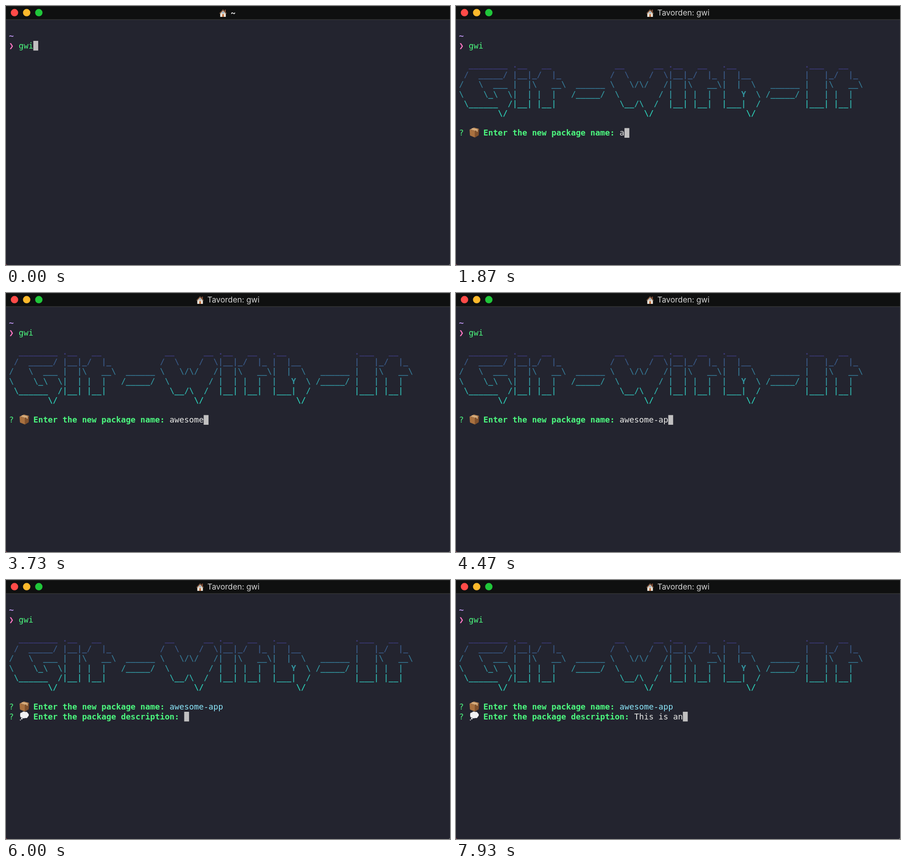
These frames come from a looping animation (978 by 572 pixels, 8 s). An HTML page with a canvas:

```html
<!DOCTYPE html>
<html lang="en">
<head>
<meta charset="utf-8">
<title>Terminal</title>
<style>
  html, body { margin: 0; width: 100%; height: 100%; overflow: hidden; background: #23242f; }
  canvas { display: block; width: 978px; height: 572px; }
</style>
</head>
<body>
<canvas id="stage" width="978" height="572"></canvas>
<script>
const ctx = document.getElementById("stage").getContext("2d");
const W = 978, H = 572, LOOP = 8000;

// Terminal grid
const X0 = 6.6, Y0 = 34.2, CELL = 10.72, LINE = 21.4, BASE = 16.6;
const MONO = '17.8px "DejaVu Sans Mono", monospace';
const SANS = "17.3px Inter, sans-serif";

const GREEN = "#4cf87f", WHITE = "#e8e8e6", CYAN = "#8be5f8";

const BANNER = String.raw`
  ________ .__   __             __      __ .__   __   .__              .___   __
 /  _____/ |__|_/  |_          /  \    /  \|__|_/  |_ |  |__           |   |_/  |_
/   \  ___ |  |\   __\  ______ \   \/\/   /|  |\   __\|  |  \   ______ |   |\   __\
\    \_\  \|  | |  |   /_____/  \        / |  | |  |  |   Y  \ /_____/ |   | |  |
 \______  /|__| |__|             \__/\  /  |__| |__|  |___|  /         |___| |__|
        \/                            \/                   \/
`.split("\n").slice(1, 7);

// Times in ms; each answer is typed at a steady pace
const RUN = 30, TITLE = 70, READY = 300, SUBMIT = 5430;
const NAME = { text: "awesome-app", start: 1800, pace: 295 };
const ABOUT = { text: "This is an", start: 6100, pace: 185 };

function typed({ text, start, pace }, t) {
  return text.slice(0, Math.max(0, Math.floor((t - start) / pace) + 1));
}

function rect(color, x, y, w, h) {
  ctx.fillStyle = color;
  ctx.fillRect(x, y, w, h);
}

function disc(color, x, y, r) {
  ctx.fillStyle = color;
  ctx.beginPath();
  ctx.arc(x, y, r, 0, Math.PI * 2);
  ctx.fill();
}

function poly(color, ...points) {
  ctx.fillStyle = color;
  ctx.beginPath();
  points.forEach(([x, y]) => ctx.lineTo(x, y));
  ctx.closePath();
  ctx.fill();
}

function at(x, y, draw) {
  ctx.save();
  ctx.translate(x, y);
  draw();
  ctx.restore();
}

function print(text, col, row, color, bold) {
  ctx.font = (bold ? "bold " : "") + MONO;
  ctx.fillStyle = color;
  [...text].forEach((ch, i) => {
    if (ch !== " ") ctx.fillText(ch, X0 + (col + i) * CELL, Y0 + row * LINE + BASE);
  });
}

function cursor(col, row) {
  rect("#c1c0c1", X0 + col * CELL, Y0 + row * LINE, CELL, LINE);
}

function house() {
  rect("#8d5038", 12.3, 1, 2.2, 5);
  rect("#ece5da", 2.3, 8, 12.4, 9);
  poly("#8a6148", [0, 9.5], [8.5, 0.3], [17, 9.5]);
  poly("#ece5da", [3, 9.6], [8.5, 4], [14, 9.6]);
  rect("#6c9cc0", 7.1, 6.2, 2.8, 2.8);
  rect("#c16a35", 6.8, 11, 3.6, 6);
}

function parcel() {
  const left = [0, 5], back = [9.5, 0.5], right = [21, 3.5], front = [12, 8.5], foot = [12, 22.5];
  poly("#c3905e", left, back, right, front);
  poly("#a9713f", left, front, foot, [1, 18]);
  poly("#80512d", front, right, [20.2, 17.5], foot);
  ctx.strokeStyle = "#dbb78b";
  ctx.lineWidth = 2.4;
  ctx.beginPath();
  ctx.moveTo(5, 2.8);
  ctx.lineTo(16.7, 6);
  ctx.lineTo(16.7, 9.5);
  ctx.stroke();
}

function thought() {
  const puffs = 7;
  for (let i = 0; i < puffs; i++) {
    const a = i / puffs * Math.PI * 2;
    disc("#f1f1f3", 10.6 + 5.8 * Math.cos(a), 8.6 + 3.6 * Math.sin(a), 4);
  }
  disc("#dedee3", 5, 16.6, 2);
  disc("#dedee3", 1.9, 19.6, 1.2);
}

function titleBar(t) {
  rect("#0f1010", 0, 0, W, 30);
  rect("#252626", 0, 0, W, 1);
  rect("#42433f", 0, 29.5, W, 1);
  ["#ff4b48", "#fdb92b", "#20c73a"].forEach((c, i) => disc(c, 18.7 + i * 26.8, 14.7, 8.1));
  const running = t >= TITLE;
  at(running ? 419 : 469.5, 7, house);
  ctx.font = (running ? "" : "600 ") + SANS;
  ctx.fillStyle = running ? "#d5d5d5" : "#e6e6e6";
  ctx.fillText(running ? "Tavorden: gwi" : "~", running ? 443.5 : 494.5, 21.3);
}

function banner() {
  BANNER.forEach((line, i) => {
    const color = `rgb(${59 - 3 * i}, ${57 + 30 * i}, ${118 + 13 * i})`;
    print(line, 0, 4 + i, color, true);
  });
}

function question(text, row, icon) {
  print("?", 0, row, GREEN);
  at(29.8, Y0 + row * LINE - 1.5, icon);
  print(text, 5, row, GREEN, true);
}

function corner(color, x, dir) {
  ctx.fillStyle = color;
  ctx.beginPath();
  ctx.moveTo(x, H - 4);
  ctx.quadraticCurveTo(x, H, x + dir * 4, H);
  ctx.lineTo(x, H);
  ctx.fill();
}

function answers(t) {
  const name = typed(NAME, t);
  const done = t >= SUBMIT;
  question("Enter the new package name:", 11, parcel);
  print(name, 33, 11, done ? CYAN : WHITE);
  if (!done) return cursor(33 + name.length, 11);

  const about = typed(ABOUT, t);
  question("Enter the package description:", 12, thought);
  print(about, 36, 12, WHITE);
  cursor(36 + about.length, 12);
}

function draw(t) {
  rect("#23242f", 0, 0, W, H);
  titleBar(t);
  print("~", 0, 1, "#bb93ee", true);
  print("❯", 0, 2, "#ff79c6", true);
  print("gwi", 2, 2, GREEN);

  if (t < RUN) cursor(5, 2);
  else if (t < READY) cursor(0, 3);
  else {
    banner();
    answers(t);
  }
  corner("#9c3340", 0, 1);
  corner("#77777c", W, -1);
}

const start = performance.now();
function tick() {
  draw((performance.now() - start) % LOOP);
  requestAnimationFrame(tick);
}
tick();
</script>
</body>
</html>
```
